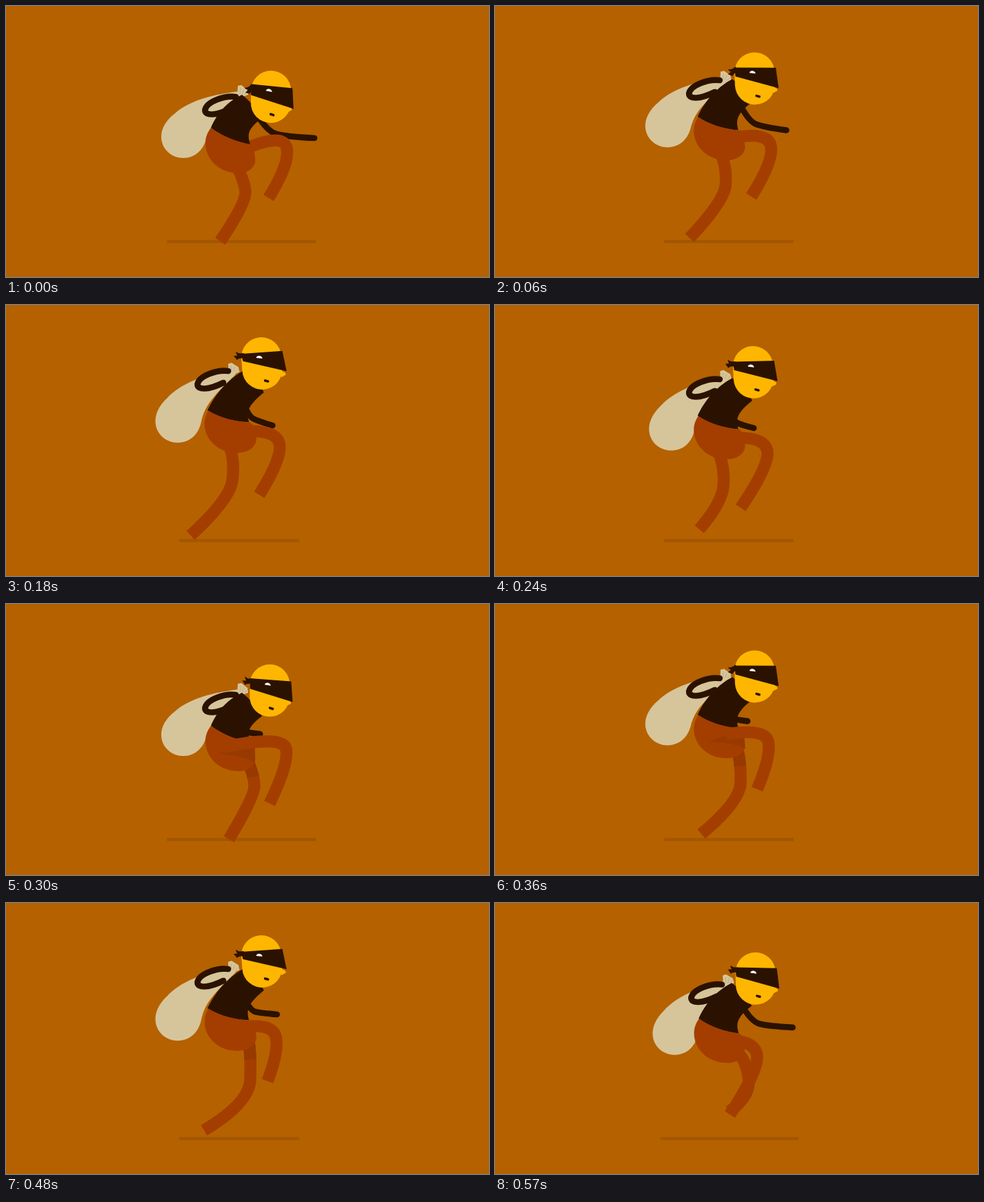
An HTML page with a canvas that plays this animation: 700 by 394 pixels, repeating every 0.6 s.

```html
<!DOCTYPE html>
<html lang="en">
<head>
<meta charset="utf-8">
<title>Running thief</title>
<style>
html, body { margin: 0; height: 100%; overflow: hidden; background: #b56100; }
canvas { display: block; width: 700px; height: 394px; }
</style>
</head>
<body>
<canvas width="700" height="394"></canvas>
<script>
const ctx = document.querySelector('canvas').getContext('2d');
const LOOP = 600, HOP = 300, STEP = 30;
const SKY = '#b56100', SHADOW = '#a35600', SKIN = '#ffb600', PANTS = '#a43e00',
      SHADE = '#983900', DARK = '#2b1200', SACK = '#d6c59a', FOLD = '#b9a97d';

// Limb poses: four control points each, measured from the body at its lowest
const plantFront = [334,232, 345,253, 349,285, 310.5,342];
const pushFront = [324,233, 332,256, 324,311, 267.5,363];
const liftFront = [315,208, 402,190, 410,232, 382,290];
const tuckFront = [345,208, 386,203, 396,242, 379,287];
const plantBack = [350,228, 360,250, 360,280, 323,342];
const pushBack = [352,231, 355,250, 353,319, 287,358.5];
const liftBack = [348,207, 403,184, 411,230, 380.5,279];
const tuckBack = [345,212, 390,209, 402,248, 367,304];
const armBack = [335,169, 342,185, 350,187, 366,189];
const armFore = [362,155, 378,182, 405,190, 447,192];

const torso = new Path2D('M297 177C304 160 318 140 342 129C350 135 365 150 371 163C351 178 349 186 354 201C335 198 314 190 297 177Z');
const pants = new Path2D('M297 177C314 190 335 198 354 201L358 204C360 212 362 222 361 228C358 238 348 244 335 243C306 242 289 220 289 200C289 190 292 184 297 177Z');
const crease = new Path2D('M308 218Q335 207 361 206L361 232Q345 220 308 218Z');
const sack = new Path2D('M340 124C300 128 265 138 245 156C232 166 225 178 225 190C225 208 240 221 257 221C275 221 286 208 290 194C297 172 310 160 345 132Z');
const ruffle = new Path2D('M335 130L336 116L341 115L350 122L351 129L340 133Z');
const folds = new Path2D('M339 128L340 119M342 128L345 121M345 129L349 125');
const sackArm = new Path2D('M333 132C316 130 291 139 288.5 151C288 160 304 160 326 149');
// Head parts are relative to its centre
const head = new Path2D('M-29 -9A29 29 0 0 1 29 -9V9A29 29 0 0 1 -29 9Z');
const nose = new Path2D('M20 10L30 16L30.5 19L24 22Z');
const eye = new Path2D('M-7.5 -8.5C-6.5 -13 1 -12 1.5 -7Z');
const mouth = new Path2D('M0 25.3L4 26.6');
const knot = new Path2D('M3 -4Q-5 -3 -8 -7.5Q-8 -3 -6 -1.5L-12 -1Q-10 1 -8 5Q-4 2 3 4Z');

const mix = (a, b, k) => a + (b - a) * k;

// Height of the body, a parabola for each hop
const hop = t => { const p = t % HOP / HOP; return p * (1 - p) / 0.24; };

// Stretches through one hop, then swings to the next pose with the foot leading
function legPose(cycle, t) {
  const first = t < HOP ? 0 : 2, u = t % HOP;
  const [low, high, next] = [0, 1, 2].map(i => cycle[(first + i) % 4]);
  if (u < 180) return low.map((n, i) => mix(n, high[i], hop(u)));
  const s = (u - 180) / 120;
  return high.map((n, i) => mix(n, next[i], s ** (8 - 2 * (i >> 1))));
}

// Falls back quickly, then accelerates forward; the hand droops on the way back
function armPose(t) {
  const reach = t < 360 ? (1 - t / 360) ** 2 : ((t - 360) / 240) ** 1.6;
  const droop = 14 * Math.max(0, Math.sin(2 * Math.PI * t / LOOP));
  return armBack.map((n, i) => mix(n, armFore[i], reach) + (i % 2) * droop * (i >> 1) / 3);
}

function curve([x0, y0, x1, y1, x2, y2, x3, y3]) {
  const path = new Path2D();
  path.moveTo(x0, y0);
  path.quadraticCurveTo(x1, y1, (x1 + x2) / 2, (y1 + y2) / 2);
  path.quadraticCurveTo(x2, y2, x3, y3);
  return path;
}

function polygon(...points) {
  const path = new Path2D();
  points.forEach(p => path.lineTo(...p));
  path.closePath();
  return path;
}

function fill(path, color) {
  ctx.fillStyle = color;
  ctx.fill(path);
}

function stroke(path, color, width, cap = 'butt') {
  ctx.strokeStyle = color;
  ctx.lineWidth = width;
  ctx.lineCap = cap;
  ctx.stroke(path);
}

function group(draw) {
  ctx.save();
  draw();
  ctx.restore();
}

function turn(x, y, degrees) {
  ctx.translate(x, y);
  ctx.rotate(degrees * Math.PI / 180);
}

function drawSack(h, p) {
  turn(343 - 13 * h, 125 - 31 * h, -8 * p ** 0.7);
  ctx.scale(1 + 0.02 * h, 1 + 0.02 * h);
  ctx.translate(-343, -125);
  fill(sack, SACK);
  fill(ruffle, SACK);
  stroke(folds, FOLD, 0.8);
}

// The head trails the body slightly
function drawHead(t) {
  const late = Math.max(0, t - 10), k = hop(late);
  turn(384 - 13 * k, 132 - 46 * k, 1 - 5 * k);
  fill(head, SKIN);
  group(() => {
    ctx.translate(3 * k, 0);
    fill(nose, SKIN);
    stroke(mouth, DARK, 3.6, 'round');
  });
  fill(polygon([-29, 2 * k - 18], [31, -13 - 3 * k], [33 + 2 * k, 17 - 3 * k], [-29 + 2 * k, -2 - 3 * k]), DARK);
  fill(eye, '#fff');
  turn(-28, -13, -45 * Math.max(0, 1 - late % HOP / 180));
  fill(knot, DARK);
}

function draw(t) {
  const h = hop(t), frontLifted = t >= HOP;
  const onBody = paint => group(() => {
    ctx.translate(0, -28 * h);
    paint();
  });

  ctx.fillStyle = SKY;
  ctx.fillRect(0, 0, 700, 394);

  const ground = new Path2D();
  ground.roundRect(233 + 18 * h, 340.3, 216 - 42 * h, 4.5, 1.5);
  fill(ground, SHADOW);

  group(() => drawSack(h, t % HOP / HOP));

  onBody(() => {
    stroke(curve(armPose(t)), DARK, 8.7, 'round');
    const leg = curve(legPose([liftBack, tuckBack, plantBack, pushBack], t));
    stroke(leg, PANTS, 17.5);
    if (frontLifted && t < 540) {
      ctx.setLineDash([25, 999]);
      stroke(leg, SHADE, 17.5);
    }
  });

  group(() => {
    ctx.translate(297 - 5 * h, 177 - 24 * h);
    ctx.transform(1 + 0.09 * h, -0.15 * h, -0.08 * h, 1 + 0.07 * h, 0, 0);
    ctx.translate(-297, -177);
    fill(torso, DARK);
  });

  group(() => {
    turn(326, 210 - 27 * h, -7 * h);
    ctx.translate(-326, -210);
    fill(pants, PANTS);
    if (frontLifted && t < 450) fill(crease, SHADE);
  });

  onBody(() => stroke(curve(legPose([plantFront, pushFront, liftFront, tuckFront], t)), PANTS, 17.5));

  group(() => {
    ctx.translate(-11 * h, -36 * h);
    stroke(sackArm, DARK, 8.7, 'round');
  });

  group(() => drawHead(t));
}

function tick() {
  draw(Math.floor(performance.now() % LOOP / STEP) * STEP);
  requestAnimationFrame(tick);
}
tick();
</script>
</body>
</html>
```
